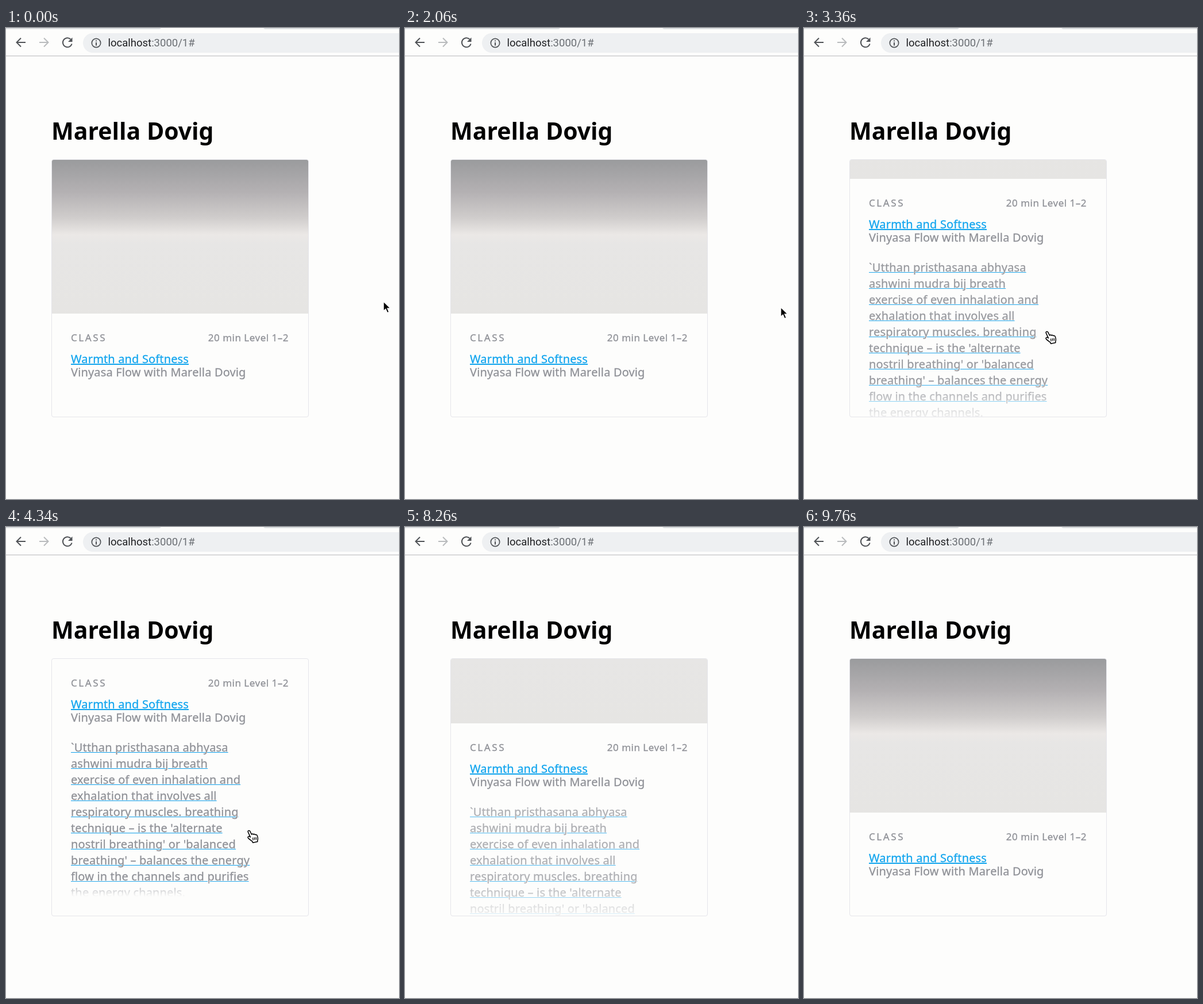
Animation, 684 px wide and 818 px high, one loop 9860 ms. Source, as an HTML page:

```html
<!DOCTYPE html>
<html lang="en">
<head>
<meta charset="utf-8">
<style>
  html, body { margin: 0; width: 100%; height: 100%; overflow: hidden; background: #fdfdfc; }
  body { position: relative; font: 500 20px/28px "Noto Sans", "Open Sans", sans-serif; letter-spacing: .15px; color: #8f9197; }
  svg, h1, .card, .card div { position: absolute; white-space: pre; }
  svg { left: 0; top: 0; }
  h1 { left: 79px; top: 150px; margin: 0; font-size: 41px; line-height: 56px; font-weight: 700; letter-spacing: 0; color: #000; }
  .card { left: 79px; top: 228px; width: 446px; height: 446px; border: 1px solid #e5e5ea; border-radius: 4px; overflow: hidden;
    -webkit-text-stroke: .3px; text-underline-offset: 1px; }
  .card .layer { inset: 0; }
  .card .photo { left: 0; top: 0; width: 446px; height: 267px;
    background: linear-gradient(#9a9b9d, #b4b1b3 56px, #d0cdcc 101px, #ebe8e6 130px, #e7e6e5 146px, #e6e5e3); }
  .card .kind { left: 33px; top: 295px; font-size: 17px; letter-spacing: 2.6px; }
  .card .level { right: 34px; top: 295px; font-size: 17px; letter-spacing: .5px; }
  .card .name { left: 33px; top: 332px; color: #12a5ee; text-decoration: underline 2px; }
  .card .style { left: 33px; top: 355px; }
  .card .about { left: 33px; top: 407px; text-decoration: underline 1px #109fea; }
</style>
</head>
<body>
<svg width="684" height="60" fill="none" stroke="#505357" stroke-width="2">
  <path d="M0 1H264Q268 1 269 0M684 1H454Q450 1 449 0" stroke="#dcdfe1"/>
  <path d="M0 48.5H684" stroke="#cbcccd" stroke-width="1.5"/>
  <rect x="134" y="9" width="600" height="34" rx="17" fill="#eef0f2" stroke="none"/>
  <path d="M34 25H19M26 17.5L18.5 25L26 32.5"/>
  <path d="M58 25H73M66 17.5L73.5 25L66 32.5" stroke="#b9bbbd"/>
  <path d="M112.5 19.5A8 8 0 1 0 114.6 27.5"/>
  <path d="M115.5 16.5V24H108Z" fill="#505357" stroke="none"/>
  <circle cx="157" cy="26" r="7.7" stroke-width="1.7"/>
  <path d="M157 25V30.5M157 21.5V23.3"/>
  <text x="177.5" y="32" fill="#202124" stroke="none" font-family="Roboto, sans-serif" font-size="18.5" font-weight="400" letter-spacing="0">localhost<tspan fill="#6a6e73">:3000/1#</tspan></text>
</svg>

<h1>Marella Dovig</h1>
<div class="card">
  <div class="layer slide">
    <div class="photo"></div>
    <div class="kind">CLASS</div>
    <div class="level">20 min Level 1–2</div>
    <div class="name">Warmth and Softness</div>
    <div class="style">Vinyasa Flow with Marella Dovig</div>
  </div>
  <div class="layer fade"><div class="about slide">`Utthan pristhasana abhyasa
ashwini mudra bij breath
exercise of even inhalation and
exhalation that involves all
respiratory muscles. breathing
technique – is the 'alternate
nostril breathing' or 'balanced
breathing' – balances the energy
flow in the channels and purifies
the energy channels.</div></div>
</div>

<svg id="cursor" width="28" height="28" overflow="visible">
  <path id="arrow" d="M0 0V16.5L3.8 13L6.6 19.6L9.6 18.3L6.8 11.9H12Z" stroke="#fff" stroke-width="1.3"/>
  <g id="hand" transform="translate(-7 -2)" fill="#fff" stroke="#000" stroke-width="1.5" stroke-linejoin="round">
    <path d="M1.2 3.6C.7 1 3.8 .2 4.9 2.6L7.4 8C8 6.8 9.9 6.7 10.7 8C11.5 7 13.2 7.2 13.9 8.6C15.2 7.8 16.8 8.6 17.4 10.4C18.4 13.4 19 16 17.7 18.6L17.8 20.6L9.6 22.2L9 20.4C7 18.6 4 16.8 1.6 14.4C0 12.6 1.8 10.6 3.8 11.6L5.4 12.6Z"/>
    <path d="M9.4 13.5L10.2 18M12.2 13L12.9 17.5M14.9 12.6L15.6 17" stroke-width="1.3"/>
  </g>
</svg>

<script>
const LOOP = 9860, HOVER_IN = 3125, HOVER_OUT = 8158, DURATION = 400;
const $ = id => document.getElementById(id);
const slides = document.querySelectorAll('.slide');
const fade = document.querySelector('.fade');
const clamp = v => Math.max(0, Math.min(1, v));

// time, x, y of the pointer tip
const route = [
  [0, 657, 475], [2060, 654, 485], [2909, 654, 485], [3309, 427, 528], [7000, 427, 528],
  [7220, 446, 528], [8084, 446, 528], [8284, 710, 510], [LOOP, 710, 510]
];

function pointerAt(t) {
  const i = Math.max(1, route.findIndex(stop => stop[0] >= t));
  const [t0, x0, y0] = route[i - 1], [t1, x1, y1] = route[i];
  const u = clamp((t - t0) / (t1 - t0)), k = u * u * (3 - 2 * u);
  return [x0 + (x1 - x0) * k, y0 + (y1 - y0) * k];
}

// The CSS "ease" curve
function ease(x) {
  x = clamp(x);
  if (x === 0 || x === 1) return x;
  let lo = 0, hi = 1, s;
  for (let i = 0; i < 20; i++) {
    s = (lo + hi) / 2;
    if (.75 * s * (1 - s) + s ** 3 < x) lo = s; else hi = s;
  }
  return .3 * s * (1 - s) ** 2 + 3 * (1 - s) * s * s + s ** 3;
}

// Even steps are shown for 100, 20 and 20 ms in turn
function stepTime(t) {
  const rest = t % 140;
  return t - rest + (rest < 100 ? 0 : rest < 120 ? 1 : 2) * 140 / 3;
}

function draw(now) {
  const t = stepTime(now % LOOP);
  const open = ease((t - HOVER_IN) / DURATION) - ease((t - HOVER_OUT) / DURATION);
  slides.forEach(el => el.style.transform = `translateY(${-267 * open}px)`);
  fade.style.opacity = open ** .6;
  const end = 413 + 45 * clamp((1 - open) * 8);
  fade.style.maskImage = `linear-gradient(#000 383px, transparent ${end}px)`;

  const [x, y] = pointerAt(t), pointing = x < 492;
  $('cursor').style.transform = `translate(${x}px, ${y}px)`;
  $('arrow').style.display = pointing ? 'none' : '';
  $('hand').style.display = pointing ? '' : 'none';
}

const start = performance.now();
(function tick() {
  draw(performance.now() - start);
  requestAnimationFrame(tick);
})();
</script>
</body>
</html>
```
